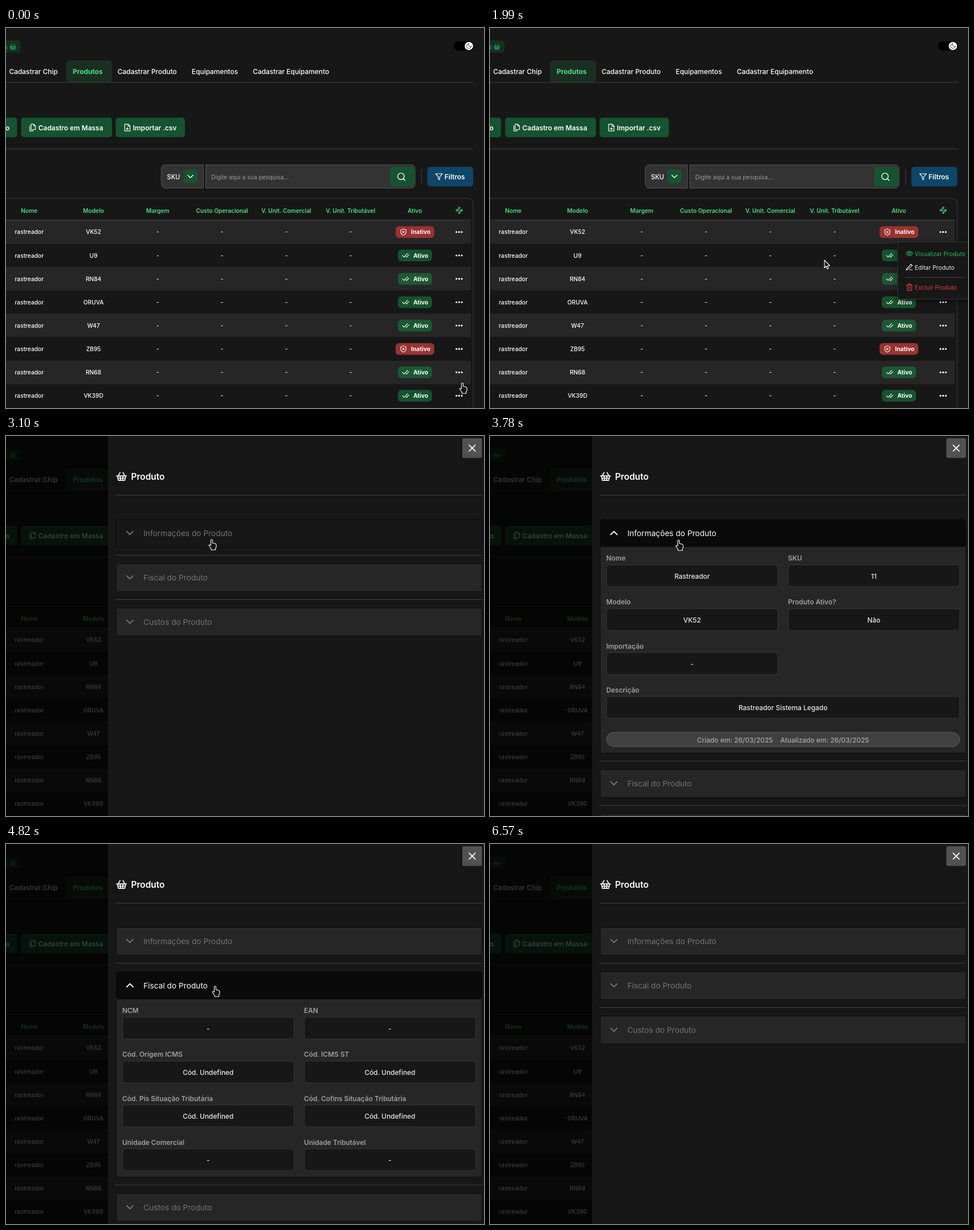
Recreate the animation shown at these times as an HTML page. Size 839 by 668 pixels, loop 6.92 s.

```html
<!DOCTYPE html>
<html lang="pt-BR">
<head>
<meta charset="utf-8">
<title>Produtos</title>
<style>
html, body { margin: 0; width: 100%; height: 100%; overflow: hidden; background: #171717; }
svg { display: block; width: 839px; height: 668px; font-family: Inter, sans-serif; }
</style>
</head>
<body>
<svg id="stage" viewBox="0 0 839 668" width="839" height="668"></svg>
<script>
const LOOP = 6920;
const GREEN = '#4ade80', DEEP = '#165330', RULE = '#404040', WHITE = '#fff';
const SMALL = 10.2, BASE = 11.9;

const ring = (x, y, r) => `M${x - r} ${y}a${r} ${r} 0 1 0 ${2 * r} 0a${r} ${r} 0 1 0 ${-2 * r} 0`;

// Icon outlines on a 24 unit grid
const ICONS = {
  basket: 'M15 11l-1 9M19 11l-4-7M2 11h20M3.5 11l2 9h13l2-9M4.5 15.5h15M5 11l4-7M9 11l1 9',
  files: 'M20 7h-5V2M7 2h8l5 5v11H7zM3 7v15h11',
  fileDown: 'M15 2H4v20h16V7zM14 2v6h6M12 12v6M9 15l3 3 3-3',
  search: ring(11, 11, 8) + 'M21 21l-4.3-4.3',
  filter: 'M22 3H2l8 9.5V19l4 2v-8.5z',
  chevron: 'M6 9l6 6 6-6',
  checks: 'M18 6L7 17l-5-5M22 10l-7.5 7.5L13 16',
  shield: 'M12 2q4 3 8 3v8q0 6-8 9q-8-3-8-9V5q4 0 8-3M14.5 9.5l-5 5M9.5 9.5l5 5',
  nodes: [[12, 4.5], [4.5, 12], [19.5, 12], [12, 19.5]].map(p => ring(...p, 2.5)).join('') + 'M10 6l-4 4M7 12h10M14 18l4-4',
  eye: 'M2 12q10-14 20 0q-10 14-20 0' + ring(12, 12, 3),
  pen: 'M12 20h9M17 3l4 4L7 19l-5 2 2-5z',
  trash: 'M3 6h18M5 6v16h14V6M8 6V2h8v4M10 11v6M14 11v6',
  close: 'M18 6L6 18M6 6l12 12',
  moon: 'M12 3a6 6 0 0 0 9 9 9 9 0 1 1-9-9'
};

const rect = (x, y, w, h, r, fill, extra = '') =>
  `<rect x="${x}" y="${y}" width="${w}" height="${h}" rx="${r}" fill="${fill}" ${extra}/>`;
const rule = (x1, x2, y, extra = '') => `<path d="M${x1} ${y}H${x2}" stroke="${RULE}" ${extra}/>`;
// y is the middle of the capitals
const text = (s, x, y, size, weight, fill, anchor = 'middle') =>
  `<text x="${x}" y="${y + size * .364}" font-size="${size}" font-weight="${weight}" fill="${fill}" text-anchor="${anchor}">${s}</text>`;
const icon = (name, cx, cy, size, color = WHITE) =>
  `<path d="${ICONS[name]}" transform="translate(${cx - size / 2} ${cy - size / 2}) scale(${size / 24})" fill="none" stroke="${color}" stroke-width="2" stroke-linecap="round" stroke-linejoin="round"/>`;
const button = (x, y, w, fill, name, label) => rect(x, y, w, 34.5, 5, fill)
  + icon(name, x + 20.5, y + 17.5, 14) + text(label, x + 30.3, y + 18, BASE, 600, WHITE, 'start');

const models = ['VK52', 'U9', 'RN84', 'ORUVA', 'W47', 'ZB95', 'RN68', 'VK39D'];
const heads = ['Nome', 'Modelo', 'Margem', 'Custo Operacional', 'V. Unit. Comercial', 'V. Unit. Tributável', 'Ativo'];
const column = i => 40.8 + 112.8 * i;

function topBar() {
  const tabs = ['Cadastrar Chip', 'Produtos', 'Cadastrar Produto', 'Equipamentos', 'Cadastrar Equipamento']
    .map((s, i) => i == 1 ? `<tspan dx="26.2" font-weight="700" fill="${GREEN}">${s}</tspan>` : `<tspan dx="${i && 26.2}">${s}</tspan>`);
  return rect(-20, 22, 45.5, 21, 4, '#15301f') + icon('basket', 12, 33, 13, '#2c9d5c') + text('s', 2.5, 33, SMALL, 600, '#2c9d5c', 'end')
    + rect(786, 23.5, 35, 16.5, 8, '#000') + `<path d="${ring(812.5, 31.7, 7.3)}" fill="#fff"/>` + icon('moon', 812.5, 31.7, 11, '#222')
    + rect(105.5, 57, 80.5, 38, 5, '#1a2f22') + text(tabs.join(''), 5.5, 77, BASE, 500, WHITE, 'start') + rule(0, 822, 95.5)
    + rect(-30, 157.5, 49.5, 34.5, 5, DEEP) + text('o', 6.2, 175.5, BASE, 600, WHITE, 'end')
    + button(26.5, 157.5, 159.5, DEEP, 'files', 'Cadastro em Massa')
    + button(192.5, 157.5, 121.5, DEEP, 'fileDown', 'Importar .csv')
    + rule(0, 820, 212.5);
}

function searchBar() {
  return '<g fill="#333" stroke="#525252"><path d="M346.5 240.5h-66q-8 0-8 8v25q0 8 8 8h66z"/>'
    + '<path d="M350.5 240.5h359.5q8 0 8 8v25q0 8-8 8H350.5z"/></g>'
    + text('SKU', 294, 261.8, 11.05, 500, WHITE) + rect(311.5, 249, 24.5, 24, 5, DEEP) + icon('chevron', 323.7, 261, 18)
    + text('Digite aqui a sua pesquisa...', 360.3, 262, 10.3, 400, '#9a9a9a', 'start')
    + rect(674, 244, 42.5, 34.5, 6, DEEP) + icon('search', 694, 261.5, 17)
    + rect(729, 248, 1, 27, 0, RULE) + button(739.5, 244, 80.5, '#0e4669', 'filter', 'Filtros');
}

function row(model, i) {
  const y = 358.7 + 41.1 * i, off = i % 5 == 0, w = off ? 68 : 60;
  const cell = (s, c) => text(s, column(c), y, SMALL, 500, WHITE);
  return (i % 2 ? '' : rect(0, Math.round(y - 20.7), 816, 41, 0, '#262626'))
    + (i ? '' : rect(783, 347, 24, 24, 6, RULE, 'id="hot"'))
    + cell('rastreador', 0) + cell(model, 1) + [2, 3, 4, 5].map(c => cell('-', c)).join('')
    + rect(717.8 - w / 2, y - 10.2, w, 20.5, 6, off ? '#993231' : i % 2 ? '#16522e' : '#1c5834')
    + icon(off ? 'shield' : 'checks', 731.5 - w / 2, y, 13.5) + text(off ? 'Inativo' : 'Ativo', 728, y, SMALL, 700, WHITE)
    + [-1, 0, 1].map(k => `<path d="${ring(795.3 + 4.7 * k, y, 1.6)}" fill="#fff"/>`).join('');
}

const table = () => '<path d="M0 299.5h810q10 0 10 10V668" fill="none" stroke="#3a3a3a"/>' + rule(0, 816, 337.5)
  + heads.map((h, i) => text(h, column(i), 321, SMALL, 600, GREEN)).join('') + icon('nodes', 795.5, 320.5, 13.5, GREEN)
  + models.map(row).join('');

function menu() {
  const item = (name, s, y, c) => icon(name, 736.2, y - .5, 13.5, c) + text(s, 745.6, y, 10.35, 400, c, 'start');
  return rect(715.5, 376, 140, 100.5, 6, '#171717', 'stroke="#363636" style="filter:drop-shadow(0 4px 5px #0006)"')
    + item('eye', 'Visualizar Produto', 397, '#22b85a') + item('pen', 'Editar Produto', 421, '#ededed')
    + rule(729, 834, 438.5) + item('trash', 'Excluir Produto', 456, '#dc4040');
}

// Fields flow in two columns; a null leaves a cell empty
const PITCH = 77.1, code = 'Cód. Undefined';
const panels = [
  { title: 'Informações do Produto', open: 3100, close: 3900, stamp: true, fields: [
    ['Nome', 'Rastreador'], ['SKU', '11'], ['Modelo', models[0]], ['Produto Ativo?', 'Não'],
    ['Importação', '-'], null, ['Descrição', 'Rastreador Sistema Legado', true]] },
  { title: 'Fiscal do Produto', open: 4680, close: 5680, fields: [
    ['NCM', '-'], ['EAN', '-'], ['Cód. Origem ICMS', code], ['Cód. ICMS ST', code],
    ['Cód. Pis Situação Tributária', code], ['Cód. Cofins Situação Tributária', code],
    ['Unidade Comercial', '-'], ['Unidade Tributável', '-']] },
  { title: 'Custos do Produto', open: LOOP, close: LOOP, fields: [] }
];

function field(f, k) {
  if (!f) return '';
  const [label, value, wide] = f, x = k % 2 ? 523 : 204, y = (k >> 1) * PITCH, w = wide ? 620 : 301;
  return text(label, x, y + 69, BASE, 600, '#a0a0a0', 'start')
    + rect(x + .5, y + 80.5, w, 38.5, 6, '#171717', 'stroke="#383838"')
    + text(value, x + w / 2 + .3, y + 100.3, BASE, 500, '#e8e8e8');
}

const stamp = () => rect(204.5, 375, 620, 25, 12.5, RULE, 'stroke="#5a5a5a"')
  + text('Criado em: 26/03/2025', 430, 388.3, BASE, 500, '#a8a8a8')
  + text('Atualizado em: 26/03/2025', 587.5, 388.3, BASE, 500, '#a8a8a8');

const panel = (p, i) => `<g id="panel${i}">
  ${i ? rule(192.5, 836, -14.5) : ''}
  <clipPath id="clip${i}">${rect(193, 49, 643, 0, 0, WHITE, `id="window${i}"`)}</clipPath>
  ${rect(193.5, .5, 642, 49, 5, '#262626', `id="card${i}" stroke="#0a0a0a"`)}
  <g clip-path="url(#clip${i})">${p.fields.map(field).join('')}${p.stamp ? stamp() : ''}</g>
  ${rect(194, 1, 641, 48, 4, '#262626', `id="head${i}"`)}
  <g id="turn${i}">${icon('chevron', 217.5, 24.5, 22, 'currentColor')}</g>
  ${text(p.title, 241.2, 24.7, 13.7, 400, 'currentColor', 'start')}</g>`;

const drawer = () => rect(179, 0, 660, 668, 0, '#171717')
  + rect(801, 4, 34.5, 34.5, 3, '#525252') + icon('close', 818.3, 21.3, 21)
  + icon('basket', 202.8, 71, 20.5) + text('Produto', 219.4, 71.7, 15.5, 600, WHITE, 'start')
  + rule(192.5, 836, 104) + panels.map(panel).join('');

document.getElementById('stage').innerHTML = `
  ${topBar() + searchBar() + table()}
  <g id="menu">${menu()}</g>
  <rect id="shade" width="839" height="668"/>
  <g id="drawer">${drawer()}</g>
  <g id="cursor" fill="#151515" stroke="#fff" stroke-width="1.1" stroke-linejoin="round">
    <path id="arrow" d="M0 0v13.5l3-3 2 5 2-1-2-4.5h4.500z"/>
    <path id="hand" d="M-1.5 9V1q1.5-2.500 3 0v5l5 1.200q2 .5 1.600 5.300l-1.500 3.500v2.200h-7.500v-2l-4-6q1-2 3.400 0z"/>
  </g>`;

const $ = id => document.getElementById(id);
const set = (id, name, value) => $(id).setAttribute(name, value);
const linear = p => p, easeOut = p => 1 - (1 - p) ** 3, smooth = p => p * p * (3 - 2 * p);
const ramp = (t, from, to, ease = linear) => ease(Math.min(1, Math.max(0, (t - from) / (to - from))));
const gray = v => `rgb(${v},${v},${v})`;

// Cursor trips: leaves, arrives, where to, pointing hand
const trips = [
  { from: 0, to: 1, x: 801, y: 624, hand: 1 },
  { from: 70, to: 420, x: 794, y: 360, hand: 1 },
  { from: 620, to: 830, x: 791, y: 376, hand: 0 },
  { from: 890, to: 1300, x: 777, y: 386, hand: 1 },
  { from: 1640, to: 1990, x: 587, y: 408, hand: 0 },
  { from: 2060, to: 2330, x: 546, y: 349, hand: 0 },
  { from: 2400, to: 2960, x: 361, y: 182, hand: 1 },
  { from: 3570, to: 3780, x: 331, y: 183, hand: 1 },
  { from: 4330, to: 4530, x: 367, y: 250, hand: 1 },
  { from: 5820, to: 6360, x: 801, y: 631, hand: 0 },
  { from: 6430, to: 6560, x: 808, y: 670, hand: 0 }
];

function moveCursor(t) {
  let { x, y, hand } = trips[0];
  for (const trip of trips) {
    if (t < trip.from) break;
    const p = ramp(t, trip.from, trip.to, smooth);
    x += (trip.x - x) * p;
    y += (trip.y - y) * p;
    hand = trip.hand;
  }
  set('cursor', 'transform', `translate(${x} ${y})`);
  set('hand', 'opacity', hand);
  set('arrow', 'opacity', 1 - hand);
}

function foldPanels(t) {
  let y = 146;
  panels.forEach(({ open, close, fields, stamp }, i) => {
    const p = ramp(t, open + 70, open + 140) - ramp(t, close, close + 210);
    const size = ramp(t, open + 40, open + 140, easeOut) - ramp(t, close, close + 210, easeOut);
    const h = size * (Math.ceil(fields.length / 2) * PITCH + 3.6 + (stamp ? 50 : 0));
    const shown = t < open + 70 ? 0 : h;
    const pressed = t >= open && t < close ? .54 : 0;
    set('panel' + i, 'transform', `translate(0 ${Math.round(y)})`);
    set('panel' + i, 'color', gray(115 + 140 * p));
    set('card' + i, 'height', 49 + shown);
    set('window' + i, 'height', shown);
    set('head' + i, 'fill', gray(38 - 28 * Math.max(pressed, p)));
    set('turn' + i, 'transform', `rotate(${180 * p} 217.5 24.5)`);
    y += 78 + shown;
  });
}

function render(t) {
  const enter = ramp(t, 2000, 2330, smooth);
  set('shade', 'opacity', .77 * enter);
  set('drawer', 'transform', `translate(${660 * (1 - enter)} 0)`);
  set('hot', 'opacity', ramp(t, 350, 420) - ramp(t, 890, 1000));
  set('menu', 'opacity', ramp(t, 890, 1000) - ramp(t, 2000, 2080));
  foldPanels(t);
  moveCursor(t);
}

const start = performance.now();
function tick() {
  render((performance.now() - start) % LOOP);
  requestAnimationFrame(tick);
}
tick();
</script>
</body>
</html>
```
